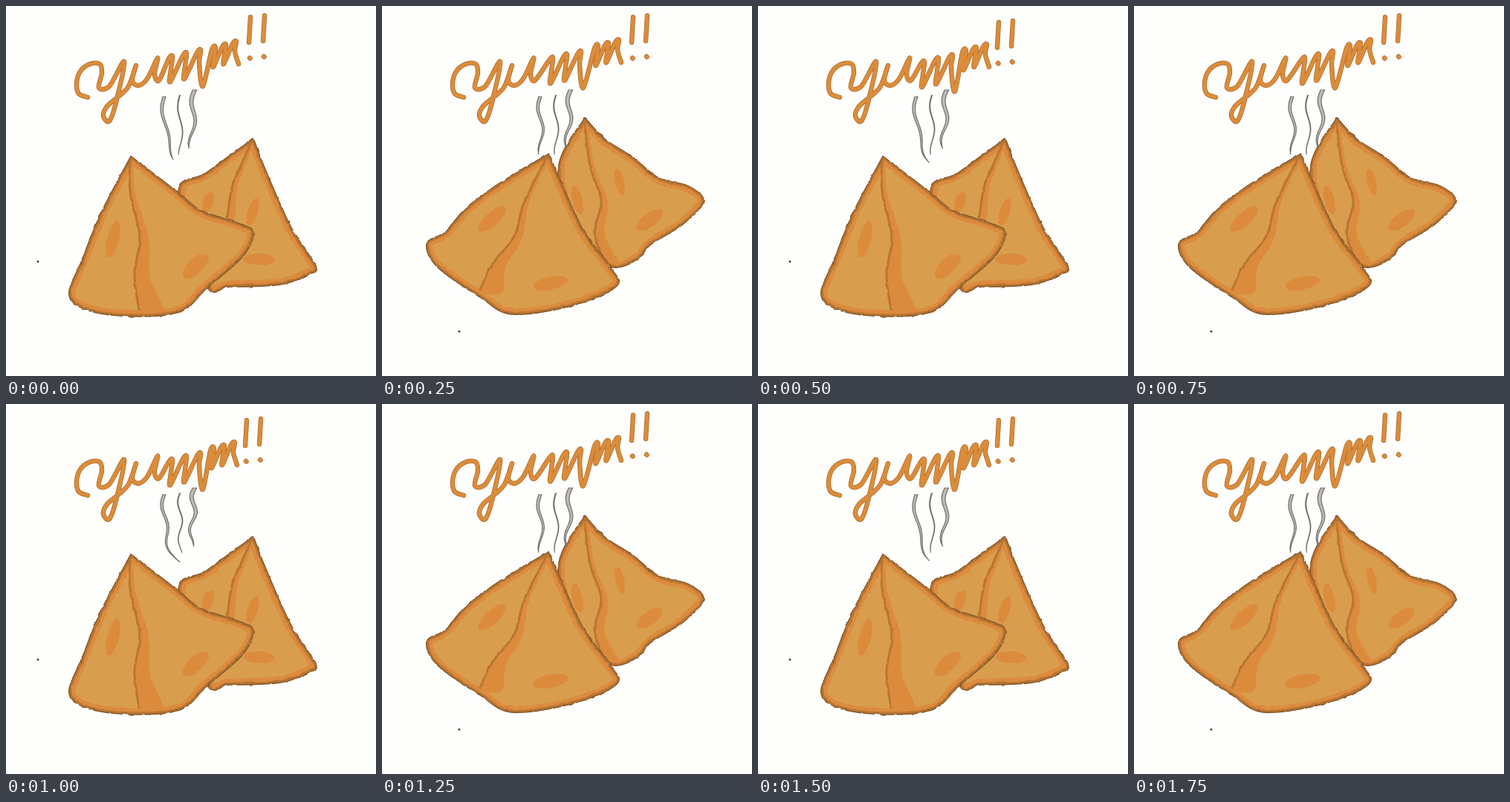
An HTML page that plays this animation: 498 by 498 pixels, repeating every 2000 ms.

```html
<!DOCTYPE html>
<html lang="en">
<head>
<meta charset="utf-8">
<title>Yumm!!</title>
<style>
html, body { margin: 0; width: 100%; height: 100%; overflow: hidden; background: #fefffd; }
svg { display: block; width: 100vw; height: 100vh; }
path { fill: none; stroke-linecap: round; stroke-linejoin: round; }
</style>
</head>
<body>
<svg id="stage" viewBox="0 0 498 498" role="img" aria-label="Yumm!!">
  <defs>
    <filter id="rough" filterUnits="userSpaceOnUse" x="0" y="0" width="498" height="498">
      <feTurbulence type="fractalNoise" baseFrequency=".13" numOctaves="2" seed="4"/>
      <feDisplacementMap in="SourceGraphic" scale="3" xChannelSelector="R" yChannelSelector="G"/>
    </filter>
  </defs>
</svg>
<script>
const stage = document.getElementById('stage');
const defs = stage.querySelector('defs');
const DOUGH = '#d89e4e', CRUST = '#dc8b3d', EDGE = '#b97532', LINE = '#85572a';
const STEP = 250;

function add(parent, tag, attrs = {}) {
  const el = document.createElementNS('http://www.w3.org/2000/svg', tag);
  for (const key in attrs) el.setAttribute(key, attrs[key]);
  parent.append(el);
  return el;
}

const stroke = (parent, d, color, width) => add(parent, 'path', { d, stroke: color, 'stroke-width': width });
const fill = (parent, d, color) => add(parent, 'path', { d, style: `fill:${color}` });
const points = text => text.trim().split(/\s+/).map(s => s.split(',').map(Number));
const shift = (list, [dx, dy]) => list.map(([x, y]) => [x + dx, y + dy]);

// Smooth curve through a list of points.
function curve(p) {
  let d = 'M' + p[0];
  for (let i = 0; i < p.length - 1; i++) {
    const a = p[i - 1] || p[i], b = p[i], c = p[i + 1], e = p[i + 2] || c;
    const c1 = b.map((v, k) => v + (c[k] - a[k]) / 6);
    const c2 = c.map((v, k) => v - (e[k] - b[k]) / 6);
    d += `C${c1} ${c2} ${c}`;
  }
  return d;
}

let clips = 0;
// The outline starts and ends at the peak; the fold widens down the crease.
function samosa(parent, { outline, crease, fold, spots }) {
  const d = curve(points(outline)) + 'Z';
  const id = 'clip' + clips++;
  add(add(defs, 'clipPath', { id }), 'path', { d });
  const body = add(parent, 'g', { 'clip-path': `url(#${id})` });
  fill(body, d, DOUGH);
  stroke(body, d, CRUST, 17);
  const seam = points(crease);
  const far = seam.map(([x, y], i) => [x + 5 + fold * (i / (seam.length - 1)) ** 2, y + i]);
  fill(body, curve([...seam, ...far.reverse()]) + 'Z', CRUST);
  for (const [x, y, rx, ry, turn] of spots) {
    add(body, 'ellipse', { cx: x, cy: y, rx, ry, fill: CRUST, transform: `rotate(${turn} ${x} ${y})` });
  }
  stroke(body, curve(seam), EDGE, 3);
  stroke(body, d, EDGE, 7);
  stroke(parent, d, LINE, 1.4);
}

function pose(parts, [cx, cy]) {
  const g = add(stage, 'g');
  const rough = add(g, 'g', { filter: 'url(#rough)' });
  parts.forEach(part => samosa(rough, part));
  add(g, 'circle', { cx, cy, r: 1.5, fill: '#4a4038' });
  return g;
}

const poses = [
  pose([{
    outline: '333,178 350,222 384,298 417,350 408,361 370,375 300,378 270,376 232,252 270,224 333,178',
    crease: '331,182 316,215 304,245 298,284',
    fold: 4,
    spots: [[272, 264, 7, 14, 20], [332, 277, 7, 19, 18], [341, 341, 21, 8, 3]]
  }, {
    outline: `168,202 232,251 262,275 318,294 333,306 318,338 270,380 238,410 185,418
      118,412 85,390 103,340 128,278 168,202`,
    crease: '167,205 167,250 180,310 173,360 179,408',
    fold: 28,
    spots: [[144, 314, 8, 25, 14], [255, 350, 22, 10, -44]]
  }], [43, 344]),
  pose([{
    outline: `273,150 300,179 337,203 372,231 412,242 433,263 405,294 362,321 345,340 312,352
      270,330 237,222 273,150`,
    crease: '272,154 280,215 295,262 286,305 300,345',
    fold: 16,
    spots: [[263, 261, 7, 20, -14], [320, 237, 6, 19, -12], [360, 288, 21, 9, -37]]
  }, {
    outline: `224,199 185,222 147,246 110,275 85,304 60,320 75,352 132,392 175,415 258,403 316,377
      308,352 270,300 237,228 224,199`,
    crease: '221,205 191,265 178,310 148,348 132,382',
    fold: 24,
    spots: [[148, 287, 24, 9, -42], [227, 373, 24, 9, -12]]
  }], [104, 438])
];

// A tapering ribbon that sways on a sine; the tip may hook to the right.
function wisp(parent, { x, top, end, width, lean, sway, pace, hook }) {
  const left = [], right = [];
  for (let t = 0; t <= 1.001; t += 1 / 14) {
    const mid = x + lean * t - sway * Math.sin(pace * t) + hook * t ** 4;
    const half = width / 2 * Math.sqrt(Math.max(0, 1 - t));
    const y = top + (end - top) * t;
    left.push([mid - half, y]);
    right.unshift([mid + half, y]);
  }
  const ribbon = fill(parent, curve([...left, ...right]) + 'Z', '#bfb9b3');
  ribbon.setAttribute('stroke', '#77716b');
  ribbon.setAttribute('stroke-width', 1.2);
}

function steam(hook, end, pace) {
  const g = add(stage, 'g');
  wisp(g, { x: 213, top: 122, end, width: 4, lean: 1, sway: 3.5, pace, hook });
  wisp(g, { x: 234, top: 120, end: 199, width: 1, lean: 1, sway: 3, pace, hook: 0 });
  wisp(g, { x: 254, top: 113, end: 191, width: 5.5, lean: -5, sway: 3.5, pace: pace + 1, hook: 0 });
  return g;
}

const plumes = [steam(14, 206, 7.5), steam(0, 199, 8.2), steam(19, 210, 8.2), steam(17, 212, 10)];

const y = points(`110,123 98,118 95,104 100,88 113,78 126,78 129,90 125,110 139,108 159,75
  148,130 139,155 131,148 136,135 151,122`);
const u = points('151,122 165,108 175,80 170,100 178,107 190,98 204,70 200,92 206,100');

// Three slanted stems, each a little higher than the one before.
function m(x, top, gap, height, drop) {
  const list = [];
  for (let i = 0; i < 3; i++) {
    const sx = x + i * gap, sy = top - i * 4;
    list.push([sx - 3, sy + 3], [sx + 2, sy], [sx, sy + height / 2], [sx - 1, sy + height]);
  }
  list.at(-1)[0] += 6;
  list.at(-1)[1] += drop;
  return list;
}

function bang([x, top]) {
  return `M${x} ${top}l-2 34m1 21l.5 .5`;
}

function word(move1, move2, mark) {
  const g = add(stage, 'g');
  const first = shift(m(222, 68, 19, 34, 14), move1);
  const last = shift(m(280, 56, 14, 26, 4), move2);
  const d = curve([...y, ...u.slice(1), ...first, ...last])
    + bang(mark) + bang([mark[0] + 19, mark[1] - 2]);
  stroke(g, d, '#a9692c', 6.4);
  stroke(g, d, '#db8c3a', 5);
  return g;
}

const words = [
  word([0, 0], [0, 0], [329, 15]),
  word([6, 2], [9, -2], [338, 15]),
  word([0, 7], [-2, 4], [324, 22])
];

function show(items, index) {
  items.forEach((el, i) => { el.style.display = i === index ? '' : 'none'; });
}

const start = performance.now();
function draw(now) {
  const step = Math.floor(Math.max(0, now - start) / STEP) % 8;
  const odd = step % 2;
  show(poses, odd);
  show(plumes, odd ? 1 : [0, 2, 3, 2][step / 2]);
  show(words, odd ? 1 : step ? 2 : 0);
  requestAnimationFrame(draw);
}
draw(start);
</script>
</body>
</html>
```
